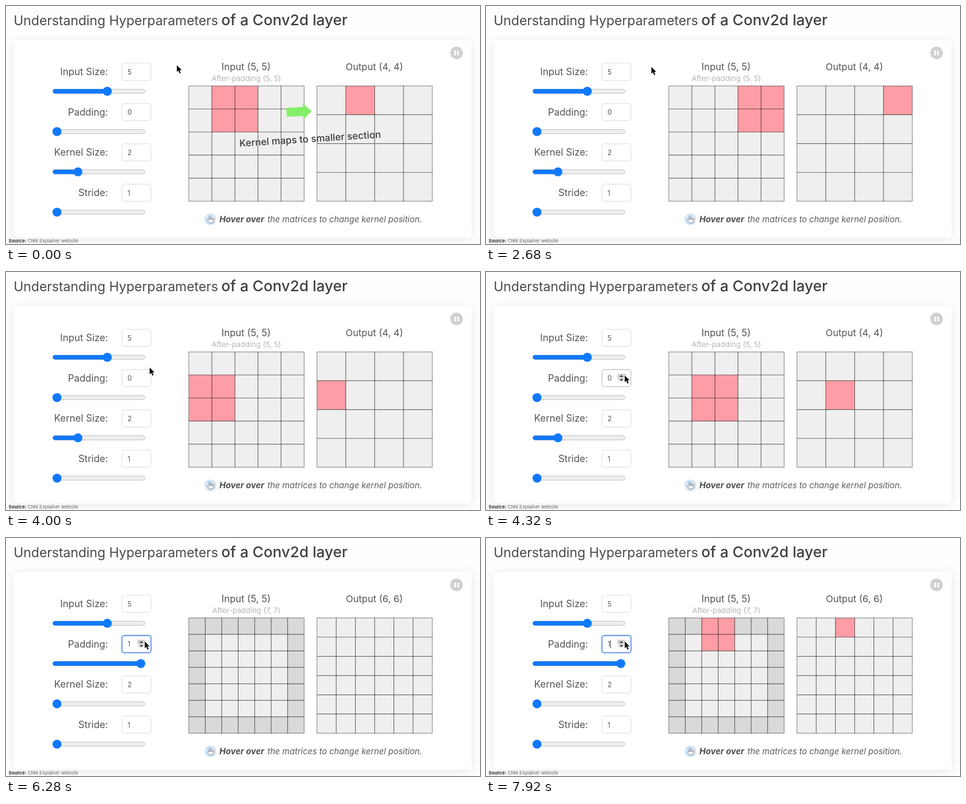
An HTML page with a canvas for the animation above (8 s loop, 960x482 px).

```html
<!DOCTYPE html>
<html lang="en">
<head>
<meta charset="utf-8">
<title>Conv2d hyperparameters</title>
<style>
html, body { margin: 0; height: 100%; overflow: hidden; background: #fefefe; }
canvas { display: block; }
</style>
</head>
<body>
<canvas id="stage" width="960" height="482"></canvas>
<script>
const LOOP = 8000, CLICK = 4440;
const BLUE = '#1079fb', PINK = '#ff9da6';
const ctx = document.getElementById('stage').getContext('2d');

// [start time, kernel column, kernel row]; column -1 means no kernel
const kernelSteps = [
  [0, 1, 0], [2040, 2, 0], [2680, 3, 0], [3360, 0, 1], [4040, 1, 1],
  [CLICK, -1, 0], [6560, 0, 0], [7240, 1, 0], [7920, 2, 0]
];
const caretToggles = [CLICK, 6280, 6560, 6760, 7240, 7560, 7880];

// [time, x, y] of the pointer tip
const pointerPath = [
  [40, 346, 120], [200, 345, 120], [2000, 345, 120], [2320, 335, 123.5],
  [3360, 335, 123.5], [3400, 334, 124], [3480, 334, 124], [4200, 281, 209.5]
];

function pointerAt(t) {
  const i = pointerPath.findIndex(p => p[0] > t);
  if (i === 0) return pointerPath[0].slice(1);
  if (i < 0) return pointerPath.at(-1).slice(1);
  const [t0, x0, y0] = pointerPath[i - 1], [t1, x1, y1] = pointerPath[i];
  const u = (t - t0) / (t1 - t0), e = u * u * (3 - 2 * u);
  return [x0 + (x1 - x0) * e, y0 + (y1 - y0) * e];
}

function text(str, x, y, size, color = '#555', style = '400', align = 'left') {
  ctx.font = `${style} ${size}px Inter, sans-serif`;
  ctx.fillStyle = color;
  ctx.textAlign = align;
  ctx.fillText(str, x, y);
}

function box(x, y, w, h, r, fill, stroke, width = 1) {
  ctx.beginPath();
  ctx.roundRect(x, y, w, h, r);
  if (fill) { ctx.fillStyle = fill; ctx.fill(); }
  if (stroke) { ctx.strokeStyle = stroke; ctx.lineWidth = width; ctx.stroke(); }
}

function disc(x, y, r, fill) {
  ctx.beginPath();
  ctx.arc(x, y, r, 0, 7);
  ctx.fillStyle = fill;
  ctx.fill();
}

function poly(points, fill, stroke, width = 1) {
  ctx.beginPath();
  points.forEach(([x, y]) => ctx.lineTo(x, y));
  ctx.closePath();
  ctx.lineJoin = 'round';
  if (stroke) { ctx.strokeStyle = stroke; ctx.lineWidth = width; ctx.stroke(); }
  ctx.fillStyle = fill;
  ctx.fill();
}

function placed(x, y, angle, draw) {
  ctx.save();
  ctx.translate(x, y);
  ctx.rotate(angle);
  draw();
  ctx.restore();
}

function drawPage() {
  ctx.fillStyle = '#fefefe';
  ctx.fillRect(0, 0, 960, 482);
  ctx.save();
  ctx.shadowColor = 'rgba(0,0,0,.09)';
  ctx.shadowBlur = 22;
  ctx.shadowOffsetY = 3;
  box(16, 69, 927, 400, 7, '#fff');
  ctx.restore();
  text('Understanding Hyperparameters', 15.5, 39, 26.65, '#4a4a4a');
  text('of a Conv2d layer', 436, 39.3, 30.4, '#414141', '500');
  text('Source:', 5.2, 479.3, 9.5, '#333', '700');
  text('CNN Explainer website', 43.7, 479.3, 9.5, '#666');
  disc(912.5, 95, 12.7, '#d0d0d0');
  box(907.8, 90.3, 3.2, 9.6, .5, '#fff');
  box(913.8, 90.3, 3.2, 9.6, .5, '#fff');
}

function drawControl(row, label, value, thumb, hover, focus) {
  const y = 133.4 + row * 81.6;
  text(label, 206.6, y + 6.8, 19.5, '#555', '400', 'right');
  if (focus) box(235, y - 17.4, 58.5, 34.6, 4.5, null, '#c3d7fb', 3.5);
  box(235, y - 17.4, 58.5, 34.6, 4.5, '#fff', focus ? '#4a80e6' : hover ? '#b4b4b4' : '#dcdcdc', focus ? 1.6 : 1.2);
  text(value, 246, y + 5.3, 14.2, '#5a5a5a');
  if (hover) {
    box(266, y - 9, 17, 8.5, 1, '#d2d2d2');
    box(266, y - .5, 17, 8, 1, '#ececec');
    poly([[270, y - 2.2], [274.2, y - 6.8], [278.4, y - 2.2]], '#505050');
    poly([[270, y + 1.6], [274.2, y + 6.2], [278.4, y + 1.6]], '#505050');
  }
  const track = y + 39.3;
  box(95, track - 4.2, 186.5, 8.4, 4.2, '#efefef', '#b8b8b8');
  box(95, track - 4.2, thumb - 95, 8.4, 4.2, BLUE, '#1b6fd8', .8);
  disc(thumb, track, 9.1, BLUE);
}

function drawGrid(x, count, pad, kernel, span) {
  const top = 161.8, size = 233.6, cell = size / count;
  ctx.fillStyle = pad ? '#d9d9d9' : '#efefef';
  ctx.fillRect(x, top, size, size);
  if (pad) {
    ctx.fillStyle = '#efefef';
    ctx.fillRect(x + cell, top + cell, size - 2 * cell, size - 2 * cell);
  }
  if (kernel[1] >= 0) {
    ctx.fillStyle = PINK;
    ctx.fillRect(x + kernel[1] * cell, top + kernel[2] * cell, span * cell, span * cell);
  }
  ctx.lineWidth = 1.2;
  for (let i = 0; i <= count; i++) {
    const d = i * cell;
    ctx.strokeStyle = i % count ? 'rgba(0,0,0,.62)' : 'rgba(0,0,0,.46)';
    ctx.beginPath();
    ctx.moveTo(x + d, top); ctx.lineTo(x + d, top + size);
    ctx.moveTo(x, top + d); ctx.lineTo(x + size, top + d);
    ctx.stroke();
  }
}

function drawHint() {
  disc(414, 432, 11.8, '#d2e4f4');
  placed(414.5, 432, 0, () => {
    const hand = new Path2D('M-3 1V-6q1.1-1.500 2.200 0V-2q1.200-1 2.200 0 1.200-.8 2.200.3 1.700-.6 2.200.7V3Q5.500 5.500 4 7.500H-2.500L-6.500 2.500Q-6.500 .3-4.700 .8Z');
    ctx.fillStyle = '#f4f8fc';
    ctx.fill(hand);
    ctx.strokeStyle = '#6a6f75';
    ctx.lineWidth = .9;
    ctx.stroke(hand);
    ctx.stroke(new Path2D('M-.8-2V1.500M1.400-2V1.500M3.600-1.700V1.500'));
  });
  text('Hover over', 432.2, 438, 17, '#4c4c4c', 'italic 700');
  text('the matrices to change kernel position.', 529.4, 438, 17, '#5c5c5c', 'italic 400');
}

function drawAnnotation() {
  placed(473, 285, -.064, () => text('Kernel maps to smaller section', 0, 0, 19.6, '#3c3c3c', '500'));
  poly([[567.8, 206.2], [601.5, 204.6], [601, 197.5], [618.8, 212.8], [602.5, 229.8],
    [602.2, 222.8], [568.6, 224.4]], '#84f069');
}

function drawPointer(x, y) {
  placed(x, y, 0, () => poly([[0, 0], [0, 13.6], [3.1, 10.8], [5.6, 16.4], [7.8, 15.4],
    [5.5, 10], [9.7, 9.7]], '#000', '#fff', 2));
}

function frame() {
  const t = performance.now() % LOOP;
  const padded = t >= CLICK ? 1 : 0;
  const [px, py] = pointerAt(t);
  const kernel = kernelSteps.findLast(s => s[0] <= t);
  const caret = caretToggles.filter(c => c <= t).length % 2;
  const inner = 5 + 2 * padded, outer = 4 + 2 * padded;

  drawPage();
  drawControl(0, 'Input Size:', 5, 205.2);
  drawControl(1, 'Padding:', padded, padded ? 273 : 103.3, py > 198, padded);
  drawControl(2, 'Kernel Size:', 2, padded ? 103.3 : 145.7);
  drawControl(3, 'Stride:', 1, 103.3);
  if (caret) box(251.7, 206.5, 1.1, 17, 0, '#333');

  text('Input (5, 5)', 486.3, 130, 19.4, '#555', '400', 'center');
  text(`After-padding (${inner}, ${inner})`, 486.7, 151.5, 15.1, '#b5b5b5', '400', 'center');
  text(`Output (${outer}, ${outer})`, 746, 130, 19.3, '#555', '400', 'center');
  drawGrid(370.2, inner, padded, kernel, 2);
  drawGrid(629.8, outer, 0, kernel, 1);
  drawHint();
  if (t < 2000) drawAnnotation();
  drawPointer(px, py);
  requestAnimationFrame(frame);
}
frame();
</script>
</body>
</html>
```
